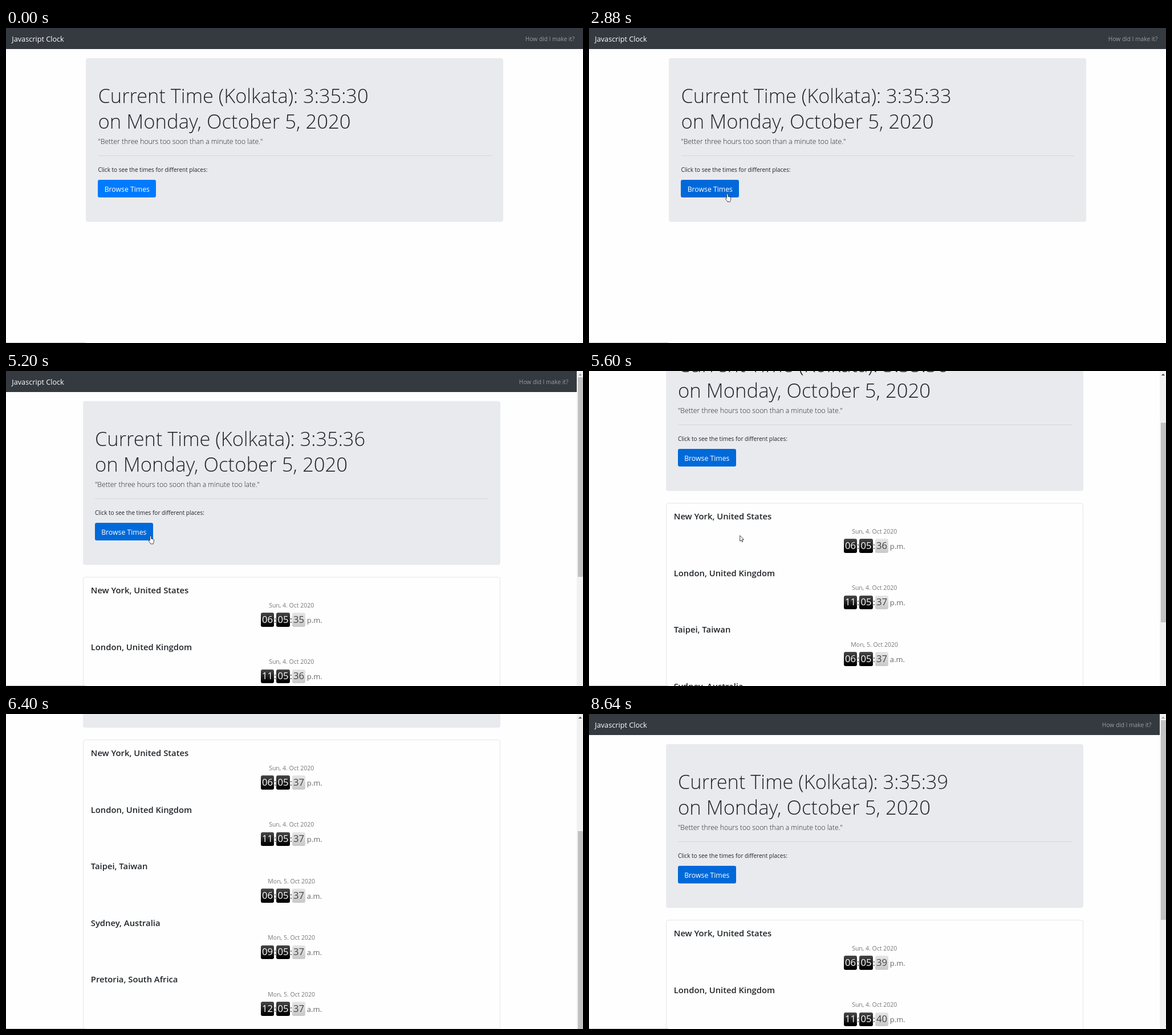
Animation, 1012 px wide and 554 px high, one loop 8.72 s. Source, as an HTML page:

```html
<!DOCTYPE html>
<html lang="en">
<head>
<meta charset="utf-8">
<title>Javascript Clock</title>
<style>
  html, body { margin: 0; width: 100%; height: 100%; overflow: hidden; background: #fefefe; }
  body { font-family: "Open Sans", "Noto Sans", sans-serif; color: #212529; }
  #stage { position: relative; width: 1012px; height: 554px; overflow: hidden; }
  #stage div, #stage span, #stage svg { position: absolute; }
  .text { line-height: 0; white-space: pre; }
  #page { left: 0; top: 0; width: 1012px; height: 900px; }
  #nav { left: 0; top: 0; width: 100%; height: 37px; background: #343a40; }
  #main { left: 50%; margin-left: -366px; width: 732px; top: 0; }
  #hero { left: 0; top: 53px; width: 732px; height: 288px; border-radius: 4px; background: #e9eaee; }
  #rule { left: 21.5px; top: 224px; width: 690px; height: 1px; background: #d4d6d9; }
  #button { left: 21px; top: 267px; width: 102px; height: 31px; border-radius: 3px; background: #007bff; }
  #fold { left: 0; top: 362px; width: 732px; overflow: hidden; }
  #card { left: 0; top: 0; width: 732px; height: 509px; box-sizing: border-box;
          border: 1px solid #e6e6e6; border-radius: 4px; background: #fefefe; }
  .row { left: 0; width: 732px; height: 99px; }
  .tile { width: 23.5px; height: 24.5px; border-radius: 3px; background: linear-gradient(#484848, #000 90%); }
  .tile.light { background: linear-gradient(#e6e6e6, #c8c8c8); }
  #bar { left: 1001px; top: 0; width: 11px; height: 554px; background: #f1f1f1; }
  #thumb { left: 1.5px; width: 9px; background: #c1c1c1; }
  #up { left: 3px; top: 4px; }
  #status { left: 0; top: 552.5px; width: 141px; height: 3px; border-radius: 0 3px 0 0; background: #c9cacb; }
  #cursor { left: 0; top: 0; overflow: visible; }
  #cursor path { fill: #fff; stroke: #333; stroke-width: .9; stroke-linejoin: round; }
</style>
</head>
<body>
<div id="stage">
  <div id="page">
    <div id="nav"></div>
    <div id="main">
      <div id="hero"></div>
      <div id="rule"></div>
      <div id="button"></div>
      <div id="fold"><div id="card"></div></div>
    </div>
  </div>
  <div id="bar">
    <svg id="up" width="6" height="4"><path d="M0 4L3 0.5L6 4z"/></svg>
    <div id="thumb"></div>
  </div>
  <div id="status"></div>
  <svg id="cursor" width="12" height="16">
    <path id="arrow" d="M.4 .4V10.2L2.7 8.2L4.2 11.6L5.7 11L4.3 7.6H7.3z"/>
    <path id="hand" transform="translate(-3.8 -1)"
      d="M2.6 8.6V1.8a1.2 1.2 0 0 1 2.4 0V5.4l3.4 .8q1.7 .5 1.5 2.2l-.5 3.1q-.2 .9-.8 1.7V14.6H4q-1-2.2-3.3-4.6q-.6-1.4 .8-1.6z"/>
  </svg>
</div>
<script>
const LOOP = 8720, STEP = 80;
const VIEW = 570, TRACK = 548, MAX_SCROLL = 317, CARD = 509;
const $ = id => document.getElementById(id);

function box(parent, className, style) {
  const el = document.createElement("div");
  el.className = className;
  Object.assign(el.style, style);
  parent.appendChild(el);
  return el;
}

// Places text by its baseline; align is "left", "center" or "right" around x.
function label(parent, str, x, base, size, color, weight = 400, align = "left") {
  const shift = { left: "0", center: "-50%", right: "-100%" }[align];
  const el = box(parent, "text", {
    left: x + "px", top: base - 0.388 * size + "px", fontSize: size + "px",
    color, fontWeight: weight, transform: `translateX(${shift})`
  });
  el.textContent = str;
  return el;
}

const DARK = "#212529";
label($("nav"), "Javascript Clock", 10.3, 24, 12.7, "#fff");
const link = label($("nav"), "How did I make it?", 0, 22.8, 10.2, "#9a9da0", 400, "right");
const main = $("main");
const title = label(main, "", 21.5, 132.8, 34.4, DARK, 300);
label(main, "on Monday, October 5, 2020", 21.5, 177.4, 34.7, DARK, 300);
label(main, "\"Better three hours too soon than a minute too late.\"", 21.5, 204.9, 12.2, DARK, 300);
label(main, "Click to see the times for different places:", 21.5, 252.8, 10, DARK);
label(main, "Browse Times", 72.3, 288.6, 12.25, "#fff", 400, "center");

const places = [
  ["New York, United States", "Sun, 4.", "06", "p.m."],
  ["London, United Kingdom", "Sun, 4.", "11", "p.m."],
  ["Taipei, Taiwan", "Mon, 5.", "06", "a.m."],
  ["Sydney, Australia", "Mon, 5.", "09", "a.m."],
  ["Pretoria, South Africa", "Mon, 5.", "12", "a.m."]
];

function tile(row, x, str, light) {
  box(row, light ? "tile light" : "tile", { left: x + "px", top: "62.3px" });
  return label(row, str, x + 11.8, 80.5, 16.7, light ? "#444" : "#fff", 400, "center");
}

const seconds = places.map(([name, day, hour, half], i) => {
  const row = box($("card"), "row", { top: i * 99.45 + "px" });
  label(row, name, 13.3, 28.2, 14.8, DARK, 600);
  label(row, day + " Oct 2020", 365.2, 53, 10.5, "#777", 400, "center");
  tile(row, 311.2, hour);
  tile(row, 338.7, "05");
  for (const x of [336.8, 364.4]) label(row, ":", x, 79.8, 15, "#222", 400, "center");
  const sec = tile(row, 366.2, "", true);
  label(row, half, 392.3, 80, 13, "#666");
  return sec;
});

const clamp = v => Math.min(1, Math.max(0, v));
const part = (t, a, b) => clamp((t - a) / (b - a));
const smooth = p => p * p * (3 - 2 * p);
const mix = (a, b, p) => a + (b - a) * p;

// The CSS "ease" curve, solved by bisection.
function ease(p) {
  const curve = (u, a, b) => 3 * u * (1 - u) ** 2 * a + 3 * u * u * (1 - u) * b + u ** 3;
  let lo = 0, hi = 1;
  for (let i = 0; i < 20; i++) {
    const mid = (lo + hi) / 2;
    if (curve(mid, .25, .25) < p) lo = mid; else hi = mid;
  }
  return curve(hi, .1, 1);
}

const ticks = [160, 1040, 2080, 2960, 3920, 4880, 5920, 6880, 7920];

// Time, x and y of the pointer tip.
const path = [[480, 352, 546], [720, 330, 526], [1120, 330, 526],
  [2000, 242.8, 292], [5040, 242.8, 292], [5360, 264.3, 289], [6080, 264.3, 289]];

function pointer(t) {
  const i = path.findIndex(([end]) => t < end);
  if (i < 1) return null;
  const [a, x, y] = path[i - 1], [b, x2, y2] = path[i];
  const p = smooth(part(t, a, b));
  return [mix(x, x2, p), mix(y, y2, p)];
}

function draw(t) {
  const open = CARD * ease(part(t, 4127, 4477));
  const full = 380 + open;
  const hasBar = full > VIEW;
  const width = hasBar ? 1001 : 1012;
  const scroll = Math.round(MAX_SCROLL *
    (smooth(part(t, 5200, 6110)) - smooth(part(t, 7255, 7755))));

  $("page").style.width = width + "px";
  $("page").style.transform = `translateY(${-scroll}px)`;
  link.style.left = width - 14.7 + "px";
  $("fold").style.height = open + "px";
  $("bar").style.display = hasBar ? "" : "none";
  $("thumb").style.top = 11 + scroll * TRACK / full + "px";
  $("thumb").style.height = TRACK * VIEW / full + "px";
  $("up").style.fill = scroll ? "#505050" : "#a3a3a3";

  title.textContent = "Current Time (Kolkata): 3:35:" + (30 + ticks.filter(v => t >= v).length);
  const first = 35 + Math.floor((t - 4405) / 985);
  const rest = 35 + Math.floor((t - 3560) / 1000);
  seconds.forEach((el, i) => { el.textContent = i ? rest : first; });

  const tip = pointer(t);
  const left = (width - 732) / 2 + 21;
  const over = tip && tip[0] > left && tip[0] < left + 102 &&
    tip[1] > 267 - scroll && tip[1] < 298 - scroll;
  $("button").style.background = over || t >= 4160 ? "#0069d9" : "#007bff";
  $("cursor").style.display = tip ? "" : "none";
  if (tip) $("cursor").style.transform = `translate(${tip[0]}px, ${tip[1]}px)`;
  $("hand").style.display = over ? "" : "none";
  $("arrow").style.display = over ? "none" : "";
}

const start = performance.now();
function frame(now) {
  const t = Math.max(0, now - start) % LOOP;
  draw(Math.floor(t / STEP) * STEP);
  requestAnimationFrame(frame);
}
draw(0);
requestAnimationFrame(frame);
</script>
</body>
</html>
```
